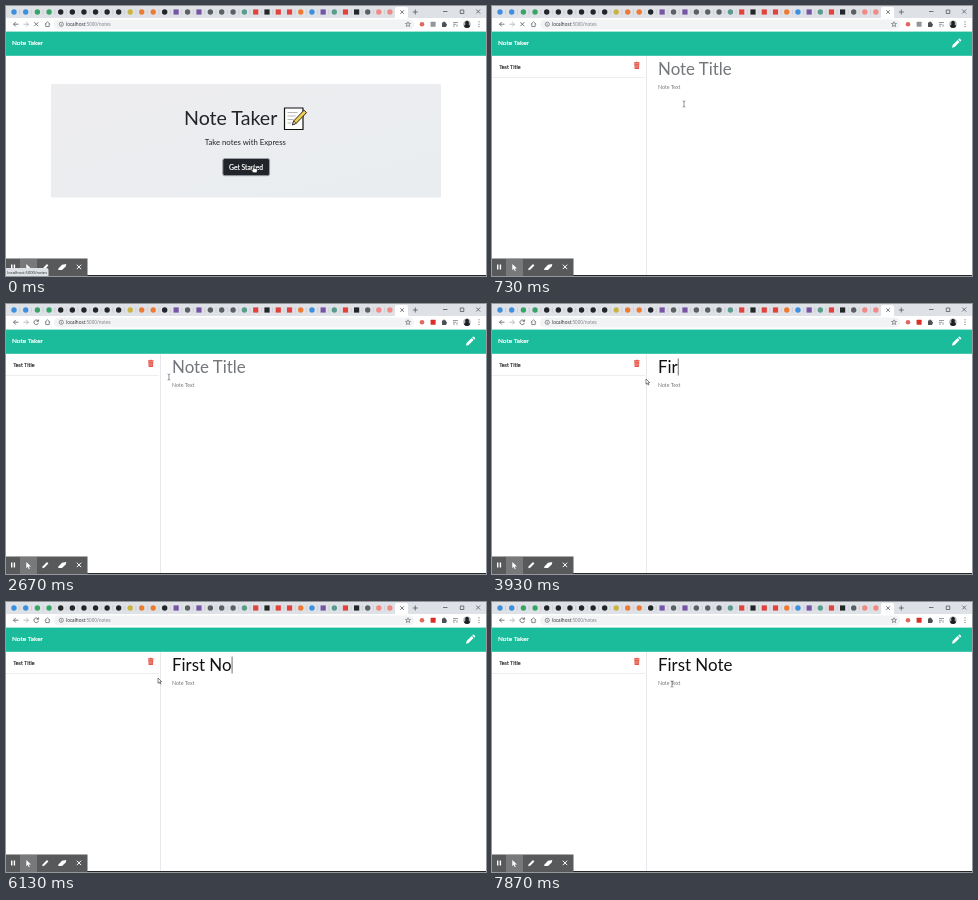
An HTML page for the animation above (8000 ms loop, 480 by 270 pixels).

```html
<!DOCTYPE html>
<html lang="en">
<head>
<meta charset="utf-8">
<title>Note Taker</title>
<style>
  html, body { margin: 0; width: 100%; height: 100%; overflow: hidden; background: #fff; }
  svg { display: block; width: 480px; height: 270px; }
  text { font-family: Lato, sans-serif; white-space: pre; fill: #212529; }
  .ui { font-family: "Open Sans", sans-serif; }
  .line { fill: none; stroke: #55595d; stroke-width: .8; }
  .white { fill: #fff; }
  .muted { fill: #73777b; }
  .firm { stroke: #212529; stroke-width: .15; }
  .firm.white { stroke: #fff; stroke-width: .22; }
</style>
</head>
<body>
<svg viewBox="0 0 480 270">
  <linearGradient id="panel" x2="1" y2="1">
    <stop stop-color="#eeedef"/><stop offset="1" stop-color="#e9edf0"/>
  </linearGradient>

  <!-- browser window -->
  <rect width="480" height="13" fill="#dee1e6"/>
  <path d="M387 13q2 0 2-2V3q0-2 2-2h9q2 0 2 2v8q0 2 2 2z" class="white"/>
  <g id="tabs"></g>
  <path class="line" d="M394.3 4.3l3.6 3.6m0-3.6l-3.6 3.6M406.8 6h5M409.3 3.5v5M437 5.5h4.500M454.300 4h3.500v3.500h-3.500zM470.200 3.500l4 4m0-4l-4 4"/>
  <rect y="12" width="480" height="14" class="white"/>
  <rect x="48" y="13.500" width="360" height="10" rx="5" fill="#f1f3f4"/>
  <path class="line" d="M12.500 18.200h-5m2.300-2.300l-2.300 2.300 2.300 2.300"/>
  <path class="line" d="M17.500 18.200h5m-2.300-2.300l2.300 2.300-2.300 2.300" style="stroke:#a9adb1"/>
  <path class="line" id="stop" d="M28.300 16.200l4 4m0-4l-4 4"/>
  <path class="line" id="reload" d="M32 16.800a2.300 2.300 0 1 0 .5 2M32.600 15.500v1.800h-1.900"/>
  <path class="line" d="M38.800 18.300l2.700-2.500 2.700 2.500m-4.400-.8v3.100h3.400v-3.100" style="stroke-width:.7"/>
  <g class="line" style="stroke-width:.6">
    <circle cx="55.300" cy="18.300" r="2.100"/>
    <path d="M55.300 18v1.500m0-2.600v.5"/>
    <path d="M402 15.800l.7 1.600 1.800.1-1.400 1.200.5 1.800-1.600-1-1.600 1 .5-1.800-1.400-1.200 1.800-.1z"/>
    <path d="M447 16.500h5m-5 1.800h3m-3 1.800h2m2-1.800v2.500"/>
  </g>
  <text class="ui" x="60" y="20" font-size="4.600">localhost<tspan fill="#777b80">:5000/notes</tspan></text>
  <circle cx="416" cy="18.300" r="2.300" fill="#e0685f"/>
  <rect id="extension" x="424.600" y="15.800" width="5" height="5" rx=".5"/>
  <path d="M436 16.500h1.200a.9.900 0 0 1 1.800 0h1.200v1.400a.9.900 0 0 1 0 1.800v1.300H436z" fill="#4d5155"/>
  <circle cx="461" cy="18.300" r="3.700" fill="#aeb2b5"/>
  <path d="M458 20.500q.5-2 1.700-2.300a1.900 2 0 1 1 2.700 0q1.200.3 1.700 2.300-3 3-6.100 0z" fill="#1d2023"/>
  <path d="M473 15.800v.1m0 2.300v.1m0 2.300v.1" stroke="#4d5155" stroke-linecap="round"/>

  <!-- page header -->
  <rect y="25.600" width="480" height="24.200" fill="#1abc9c"/>
  <text class="white firm" x="6" y="39.400" font-size="6.500">Note Taker</text>

  <g id="landing">
    <rect x="45" y="78" width="390" height="113.500" rx="1.500" fill="url(#panel)"/>
    <text x="178" y="119" font-size="19.600">Note Taker</text>
    <g stroke="#111" stroke-linejoin="round">
      <path d="M278.500 102h18.500v21.500h-18.500z" class="white" stroke-width="1.200"/>
      <path d="M281.500 106.500h10m-10 3.500h8m-8 3.500h6m-6 3.500h4" stroke="#a5a5a5" stroke-width=".8"/>
      <path d="M286.500 118.800l1.300-4 10.200-10.600 2.500 2.500-10.300 10.700z" fill="#f3cd50" stroke-width=".9"/>
      <path d="M286.500 118.800l1.300-4 2.400 2.600z" fill="#f3dcb4" stroke-width=".6"/>
    </g>
    <text x="198.700" y="139.400" font-size="7.750">Take notes with Express</text>
    <rect x="216.800" y="152.500" width="46.800" height="17.200" rx="2" fill="#212529" stroke="#9ba0a6"/>
    <text class="white firm" x="223" y="163.700" font-size="6.750">Get Started</text>
  </g>

  <g id="notes">
    <path d="M0 71.500h153" stroke="#dfe2e5" stroke-width=".6"/>
    <path d="M154.500 50v219" stroke="#dde0e6" stroke-width=".7"/>
    <text class="firm" x="7.300" y="62.600" font-size="5.350">Test Title</text>
    <path d="M142 56.300h1.700l.4-.6h1.400l.4.600h1.700v.9H142zm.3 1.300h5l-.3 5.400h-4.400z" fill="#e4574a"/>
    <path d="M143.700 58.700v3.200m1.100-3.200v3.200m1.100-3.200v3.200" stroke="#f7c6c1" stroke-width=".4"/>
    <path d="M460 41.700l.6-2.600 5-5 2 2-5 5zM466.200 33.500l.7-.7q.6-.4 1.200.100l.8.800q.5.600.1 1.200l-.7.700z" class="white"/>
    <text id="title" x="166" y="69.200" font-size="16.900"></text>
    <path id="caret" d="M0 54.500v17" stroke="#333" stroke-width=".7"/>
    <text class="muted" x="166" y="83" font-size="5.250">Note Text</text>
  </g>

  <!-- recorder bar and desktop edge -->
  <rect y="269" width="480" height="1" fill="#24272a"/>
  <rect y="252.500" width="81.500" height="17.500" fill="#58595b"/>
  <rect x="14" y="253" width="17" height="17" fill="#78797b"/>
  <g class="white">
    <path d="M5 258.500h1.400v5H5zM7.700 258.500h1.400v5H7.700z"/>
    <path d="M20.300 258l4.700 4.400-2.300.1 1.100 2.300-.9.400-1.100-2.400-1.500 1.500z"/>
    <path d="M36.200 264.300l.6-2 4.200-4.200 1.400 1.400-4.200 4.200z"/>
    <path d="M52 263l4-4.200 4.300-.7-.6 2.500-3.700 3.500h-3.500z"/>
  </g>
  <path d="M70.800 258.700l4.400 4.400m0-4.400l-4.400 4.400" stroke="#fff"/>
  <g id="status">
    <path d="M0 262h40.500q2 0 2 2v6H0z" fill="#dee1e6"/>
    <text class="ui" x="1.300" y="267.600" font-size="4.100">localhost:5000/notes</text>
  </g>

  <!-- pointer shapes, centred on the hot area -->
  <g id="pointer">
    <path id="hand" d="M-1.300-3.500q.6-.8 1.200 0v2.700l3 .7q.7.300.5 1.200l-.6 2.600H-.700l-2.300-2.600q.2-1 1.700 0z" fill="#fff" stroke="#111" stroke-width=".6"/>
    <path id="beam" class="line" d="M-1.300-3Q0-3 0-2.300v4.600q0 .7-1.300.7M1.300-3Q0-3 0-2.300m0 4.600q0 .7 1.300.7" style="stroke-width:.65"/>
    <path id="arrow" d="M0-3v5.200l1.200-1.100.9 1.900.9-.4-.9-1.900h1.600z" fill="#fff" stroke="#111" stroke-width=".5"/>
  </g>
</svg>
<script>
const LOOP = 8000, OPEN_AT = 730, LOADED_AT = 930;
const $ = id => document.getElementById(id);
const show = (id, on) => $(id).style.display = on ? '' : 'none';

// One letter per tab icon; capitals are squares.
const colors = { b: '#3d8fe0', g: '#37a567', k: '#222629', y: '#c9b344', o: '#ee7b35',
  p: '#7755a5', d: '#5b6065', c: '#5b9d8c', r: '#e2413c', f: '#ef8a85' };
const icons = 'bbggkkkkkkyookPdPdddcRKRRobPcRKdff';
$('tabs').innerHTML = [...icons].map((c, i) => {
  const x = 8 + 11.72 * i - .01 * i * i, fill = colors[c.toLowerCase()];
  const mark = c < 'a'
    ? `<rect x="${x - 2.6}" y="3.400" width="5.200" height="5.200" fill="${fill}"/>`
    : `<circle cx="${x}" cy="6" r="2.700" fill="${fill}"/>`;
  return mark + (i < 33 ? `<path d="M${x + 5.7} 3.500v5" stroke="#b4b8bd" stroke-width=".4"/>` : '');
}).join('');

const typed = 'First Note';
const keyTimes = [3270, 3670, 3870, 4470, 4800, 5000, 5400, 5930, 6730, 6870];

// time, x, y
const path = [
  [0, 248, 163], [70, 248, 163], [600, 192, 98], [930, 192, 98], [1270, 191, 73],
  [1730, 191, 73], [1870, 193, 66], [2470, 193, 66], [2660, 163, 73], [2870, 154, 78],
  [4470, 154, 78], [4600, 152, 79], [7330, 152, 79], [7800, 180, 82], [LOOP, 180, 82]
];

function pointerAt(t) {
  const i = path.findIndex(p => p[0] > t);
  const [t0, x0, y0] = path[i - 1], [t1, x1, y1] = path[i];
  const u = (t - t0) / (t1 - t0), e = u * u * (3 - 2 * u);
  return [x0 + (x1 - x0) * e, y0 + (y1 - y0) * e];
}

function draw(now) {
  const t = now % LOOP;
  const [x, y] = pointerAt(t);
  const onNotes = t >= OPEN_AT, loaded = t >= LOADED_AT;
  const onButton = !onNotes && y > 153;
  const count = keyTimes.filter(k => k <= t).length;

  show('landing', !onNotes);
  show('notes', onNotes);
  show('stop', !loaded);
  show('reload', loaded);
  show('status', onButton);
  $('extension').setAttribute('fill', t >= 1470 ? '#d92f27' : '#92969a');

  const title = $('title');
  title.textContent = count ? typed.slice(0, count) : 'Note Title';
  title.style.fill = count ? '#111' : '#73777b';
  show('caret', count && t < 7330);
  if (count) $('caret').setAttribute('transform', `translate(${166.5 + title.getComputedTextLength()})`);

  $('pointer').setAttribute('transform', `translate(${x} ${y})`);
  show('hand', onButton);
  show('beam', !onButton && x > 160);
  show('arrow', x <= 160);
  requestAnimationFrame(() => draw(performance.now() - start));
}
const start = performance.now();
draw(0);
</script>
</body>
</html>
```
